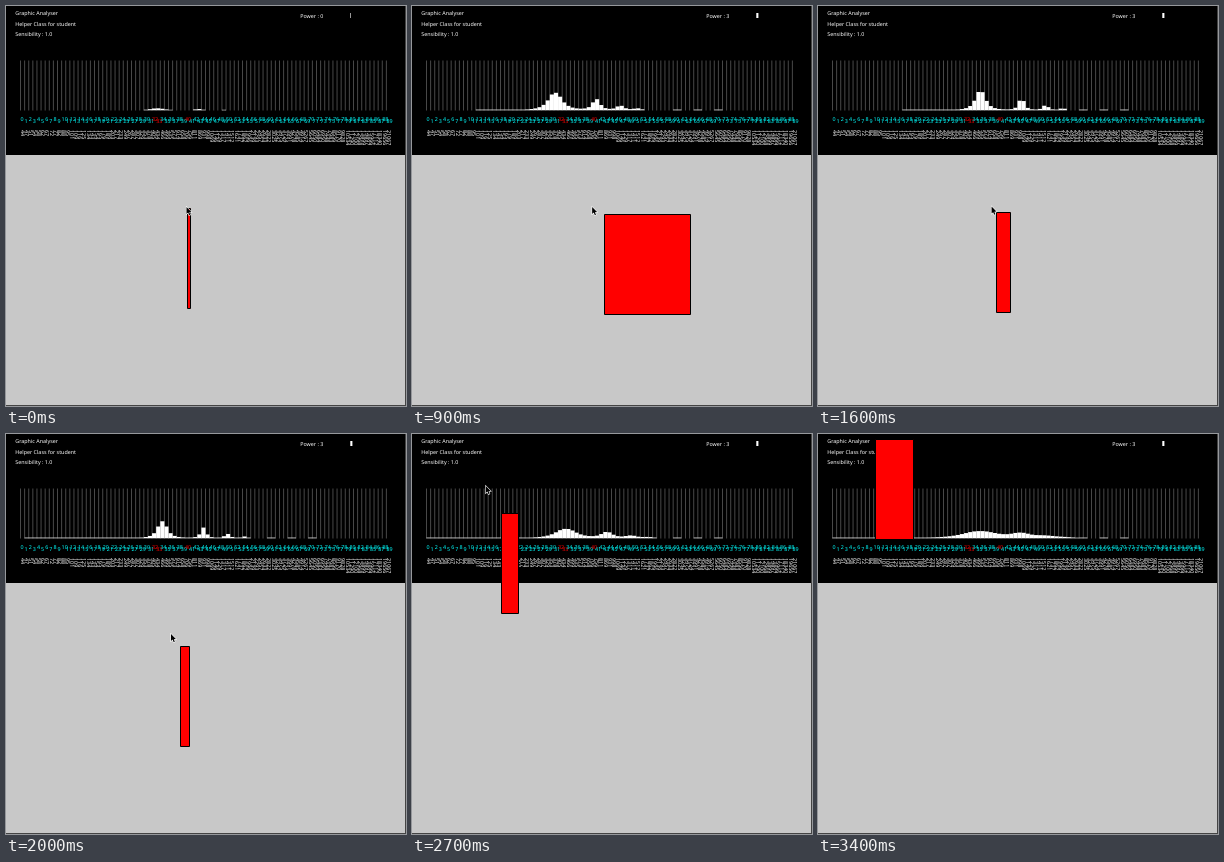
These frames come from a looping animation (400 px wide and 400 px high, 3.5 s). An HTML page with a canvas:

```html
<!DOCTYPE html>
<html lang="en">
<head>
<meta charset="utf-8">
<title>Graphic Analyser</title>
<style>
html, body { margin: 0; width: 100%; height: 100%; overflow: hidden; background: #c8c8c8; }
canvas { display: block; width: 400px; height: 400px; }
</style>
</head>
<body>
<canvas id="stage" width="400" height="400"></canvas>
<script>
const ctx = document.getElementById('stage').getContext('2d');
const LOOP = 3500, STEP = 100;
const BANDS = 90, LEFT = 14.5, GAP = 4.111, BASE = 104.3;
const RED_BANDS = [32, 33, 40];

// time, then x, y, width
const box = [
  [0, 181.5, 202, 3], [400, 187.5, 206.5, 9], [900, 192, 208.5, 86],
  [1300, 181.5, 201.5, 18], [2000, 174.5, 212, 9], [2500, 172, 207, 12],
  [2700, 89.5, 79.5, 17], [3100, 57, 14, 31], [3400, 57.5, 5.5, 38]
];
// time, then x, y
const pointer = [
  [0, 180.5, 201], [1300, 180, 201], [2000, 165, 200],
  [2500, 165, 200], [2700, 73.8, 52], [2900, 48, -14]
];
// time, then pitch band, loudness, spread and noise reach of the whistled note
const note = [
  [0, 32.8, 2, 2, 2], [400, 32.4, 7.3, 2, 14], [900, 30.8, 17.5, 2, 19],
  [1300, 36.6, 21.5, 1.5, 8], [2000, 34, 17, 1.4, 34],
  [2700, 33.4, 9.4, 3, 34], [3400, 35.3, 7, 5, 36]
];

function at(keys, t) {
  const next = keys.findIndex(k => k[0] > t);
  if (next < 0) return keys[keys.length - 1].slice(1);
  const a = keys[next - 1], b = keys[next];
  const p = (t - a[0]) / (b[0] - a[0]);
  return a.slice(1).map((v, i) => v + (b[i + 1] - v) * p);
}

function text(str, x, y, color = '#fff') {
  ctx.fillStyle = color;
  ctx.fillText(str, x, y);
}

function drawLabels(t) {
  const power = Math.min(3, Math.floor(t / 200));
  text('Graphic Analyser', 9.3, 9.2);
  text('Helper Class for student', 9.3, 19.8);
  text('Sensibility : 1.0', 9.3, 30);
  text('Power : ' + power, 294.2, 12);
  ctx.fillRect(344.3, 7, 0.6 + power * 0.5, 5);
}

function drawScale() {
  for (let i = 0; i < BANDS; i++) {
    const x = LEFT + i * GAP;
    ctx.fillStyle = '#484848';
    ctx.fillRect(x - 0.5, 54.5, 1, 50);
    text(i, x, i % 2 ? 117.4 : 114.5, RED_BANDS.includes(i) ? '#f00' : '#0ff');
    ctx.save();
    ctx.translate(x + 0.3, 124);
    ctx.rotate(Math.PI / 2);
    text(Math.round(44.1 * 2 ** (i / 10)), 0, 0); // ten bands per octave
    ctx.restore();
  }
}

function drawSpectrum(t) {
  const [pitch, loud, spread, reach] = at(note, t);
  const peak = (i, centre, height, width) =>
    height / (1 + Math.abs((i - centre) / width) ** 2.4);
  // overtones 2, 3 and 4 lie log2(n) octaves above the note
  const level = i => [1, 0.62, 0.25, 0.1].reduce((sum, gain, n) => sum +
    peak(i, pitch + 10 * Math.log2(n + 1), loud * gain, n ? spread * 0.55 : spread), 0);

  ctx.fillStyle = '#fff';
  for (let i = 0; i < BANDS; i++) {
    const hum = i > pitch - reach && i < pitch + Math.min(reach * 1.5, 20);
    const hiss = t >= 900 && i >= 60 && i < 72 && i % 5 < 2;
    const h = Math.max(level(i), hum || hiss ? 0.7 : 0);
    if (h > 0.5) ctx.fillRect(LEFT + i * GAP, BASE - h, GAP, h);
  }
}

function drawBox(t) {
  const [x, y, w] = at(box, t).map(Math.floor);
  ctx.fillStyle = '#f00';
  ctx.strokeStyle = '#000';
  ctx.lineWidth = 1;
  ctx.beginPath();
  ctx.rect(x + 0.5, y + 0.5, w, 100);
  ctx.fill();
  ctx.stroke();
}

function drawPointer(t) {
  const [x, y] = at(pointer, t);
  ctx.save();
  ctx.translate(x, y);
  ctx.beginPath();
  [[0, 0], [0, 7], [1.6, 5.6], [2.7, 8.2], [3.8, 7.7], [2.8, 5.2], [4.9, 5]]
    .forEach(p => ctx.lineTo(...p));
  ctx.closePath();
  ctx.strokeStyle = '#fff';
  ctx.lineWidth = 1.1;
  ctx.stroke();
  ctx.fillStyle = '#000';
  ctx.fill();
  ctx.restore();
}

function draw(now) {
  let t = Math.floor(now % LOOP / STEP) * STEP;
  if (t === 2500) t -= STEP; // the picture rests for one step here
  ctx.fillStyle = '#c8c8c8';
  ctx.fillRect(0, 0, 400, 400);
  ctx.fillStyle = '#000';
  ctx.fillRect(0, 0, 400, 149);
  ctx.fillStyle = '#444';
  ctx.fillRect(399, 0, 1, 400);
  ctx.fillRect(0, 399, 400, 1);
  ctx.font = '5.37px "Noto Sans", "Open Sans", sans-serif';
  ctx.textRendering = 'geometricPrecision';
  drawScale();
  drawSpectrum(t);
  drawLabels(t);
  drawBox(t);
  drawPointer(t);
}

const start = performance.now();
function tick() {
  draw(performance.now() - start);
  requestAnimationFrame(tick);
}
tick();
</script>
</body>
</html>
```
